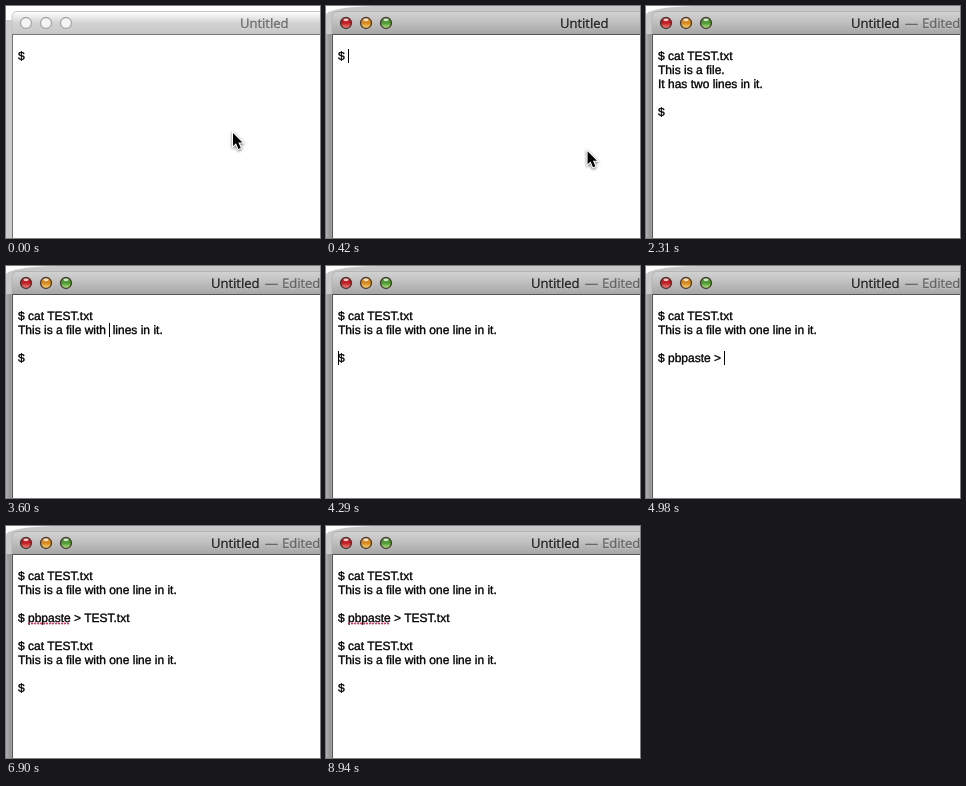
These frames come from a looping animation (314 px wide and 232 px high, 9120 ms). An HTML page with a canvas:

```html
<!DOCTYPE html>
<html lang="en">
<head>
<meta charset="utf-8">
<title>Editing a file in a text window</title>
<style>
html, body { margin: 0; width: 100%; height: 100%; overflow: hidden; background: #fff; }
canvas { display: block; }
</style>
</head>
<body>
<canvas id="stage" width="314" height="232"></canvas>
<script>
const LOOP = 9120, LEFT = 12, TOP = 43, ROW = 14;
const CLICK = 210, EDITED = 1320, SPELL = 5520;
const BODY = '12px "Liberation Sans", Arial, sans-serif';
const TITLE = '13px "Open Sans", sans-serif';
const ctx = document.getElementById('stage').getContext('2d');
ctx.textRendering = 'geometricPrecision';

// The document is built by an edit script; each edit stores a snapshot.
const states = [];
let text = '$ ', pos = 2, anchor = 2;
const save = t => states.push({ t, text, pos, anchor });

function replace(t, part) {
  const a = Math.min(pos, anchor), b = Math.max(pos, anchor);
  text = text.slice(0, a) + part + text.slice(b);
  pos = anchor = a + part.length;
  save(t);
}
function type(t, gap, parts) {
  [...parts].forEach((part, i) => replace(t + i * gap, part));
}
function go(t, p) { pos = anchor = p; save(t); }
function select(t, p) { pos = p; save(t); }
function backspace(t) { anchor = pos - 1; replace(t, ''); }
const after = word => text.indexOf(word) + word.length;

save(0);
type(1320, 40, 'cat TEST.txt');
type(1800, 45, ['\n', 'This is a file.', '\nIt has two lines in it.', '\n', '\n$ ']);

go(2430, after('in it.\n'));
go(2490, after('It '));
go(2550, after('\nT'));
go(2610, after('file.'));
backspace(2700);
type(2760, 72, ' with ');
select(3150, after('with \n'));
select(3180, after('It'));
select(3210, after('It '));
select(3240, after('has'));
select(3270, after('has '));
select(3300, after('two'));
replace(3600, '');
type(3630, 60, 'one');
go(3870, after('lines'));
backspace(3990);
go(4140, after('it.\n'));
go(4230, text.length - 2);
go(4320, text.length);

type(4530, 50, 'pbpaste > ');
type(5040, 52, 'TEST.txt');
replace(5520, '\n\n$ ');
type(5670, 60, ['ca', 't ', 'TE', 'ST', '.t', 'xt']);
type(6120, 67.5, ['\n', 'This is a file with one line in it.', '\n', '\n', '$ ']);

// Caret is hidden between each pair of times.
const hidden = [[0, 210], [450, 690], [930, 1170], [2220, 2430], [6660, 6720],
  [6900, 7170], [7410, 7680], [7920, 8160], [8430, 8670], [8940, LOOP]];

function box(x, y, w, h, fill) {
  ctx.fillStyle = fill;
  ctx.fillRect(x, y, w, h);
}
function shade(x0, y0, x1, y1, ...colors) {
  const g = ctx.createLinearGradient(x0, y0, x1, y1);
  colors.forEach((c, i) => g.addColorStop(i / (colors.length - 1), c));
  return g;
}
// A thin outline gives the text its heavier weight.
function label(str, x, y, color) {
  ctx.fillStyle = ctx.strokeStyle = color;
  ctx.lineWidth = 0.35;
  ctx.fillText(str, x, y);
  ctx.strokeText(str, x, y);
}
function titleText(str, x, color) {
  ctx.fillStyle = 'rgba(255,255,255,.45)';
  ctx.fillText(str, x, 23);
  label(str, x, 22, color);
}

function button(x, active, dark, light) {
  ctx.beginPath();
  ctx.arc(x, 17, 5.5, 0, 7);
  ctx.fillStyle = active ? shade(0, 11, 0, 23, dark, dark, light) : '#f4f4f4';
  ctx.fill();
  ctx.lineWidth = 1.3;
  ctx.strokeStyle = active ? 'rgba(45,30,25,.8)' : '#a8a8a8';
  ctx.stroke();
  if (!active) return;
  ctx.beginPath();
  ctx.ellipse(x, 13.8, 2.6, 1.4, 0, 0, 7);
  ctx.fillStyle = 'rgba(255,255,255,.75)';
  ctx.fill();
}

function drawWindow(t) {
  const active = t >= CLICK;
  box(0, 0, 314, 232, '#fff');
  if (active) {
    ctx.beginPath();
    ctx.ellipse(50, 9, 50, 9, 0, Math.PI, Math.PI * 1.5);
    ctx.lineTo(314, 0);
    ctx.lineTo(314, 28);
    ctx.lineTo(0, 28);
    ctx.fillStyle = '#c9c9c9';
    ctx.fill();
  }
  box(0, active ? 28 : 14, 6, 218, active ? shade(0, 0, 6, 0, '#aeaeae', '#8c8c8c') : '#ccc');

  ctx.beginPath();
  ctx.roundRect(6, 5.5, 330, 240, [5, 0, 0, 0]);
  ctx.fillStyle = active ? shade(0, 6, 0, 28, '#d2d2d2', '#bebebe', '#a6a6a6')
                         : shade(0, 6, 0, 28, '#fff', '#d2d2d2', '#c8c8c8');
  ctx.fill();
  ctx.lineWidth = 1;
  ctx.strokeStyle = active ? '#b4b4b4' : '#c4c4c4';
  ctx.stroke();
  box(6, 28, 308, 1, active ? '#555' : '#777');
  box(6, 28, 1, 204, active ? '#555' : '#777');
  box(7, 29, 307, 203, '#fff');

  button(20, active, '#c01f25', '#ff9b90');
  button(40, active, '#d58a1f', '#ffe28a');
  button(60, active, '#4d9a30', '#c9f09a');

  ctx.font = TITLE;
  if (t < EDITED) return titleText('Untitled', 234, active ? '#222' : '#6c6c6c');
  titleText('Untitled', 205, '#222');
  titleText('—', 259, '#666');
  titleText('Edited', 276, '#666');
}

function drawDocument(t) {
  const s = states.findLast(state => state.t <= t);
  const from = Math.min(s.pos, s.anchor), to = Math.max(s.pos, s.anchor);
  const x = str => LEFT + ctx.measureText(str).width;
  ctx.font = BODY;
  let start = 0;
  s.text.split('\n').forEach((line, i) => {
    const y = TOP + i * ROW, end = start + line.length;
    if (from < to && from <= end && to > start) {
      const x0 = x(line.slice(0, Math.max(0, from - start)));
      const x1 = to > end ? 314 : x(line.slice(0, to - start));
      box(x0, y, x1 - x0, ROW, '#b5d5fd');
    }
    label(line, LEFT, y + 11, '#000');
    if (t >= SPELL && line.includes('pbpaste')) {
      ctx.save();
      ctx.lineWidth = 2.2;
      ctx.lineCap = 'round';
      ctx.setLineDash([0, 3]);
      ctx.strokeStyle = '#d4365c';
      ctx.beginPath();
      ctx.moveTo(x('$ ') + 1, y + 12.5);
      ctx.lineTo(x('$ pbpaste'), y + 12.5);
      ctx.stroke();
      ctx.restore();
    }
    const blinkOff = hidden.some(([a, b]) => t >= a && t < b);
    if (from === to && from >= start && from <= end && !blinkOff) {
      box(Math.floor(x(line.slice(0, from - start))), y, 1, ROW, '#000');
    }
    start = end + 1;
  });
}

function drawPointer(t) {
  if (t >= 540) return;
  const k = Math.max(0, (t - 240) / 300) ** 2;
  ctx.save();
  ctx.translate(227 + 95 * k, 127 + 50 * k);
  ctx.beginPath();
  [[0, 0], [0, 13], [3, 10.3], [5.4, 16], [7.8, 15], [5.4, 9.5], [9.4, 9.5]]
    .forEach(p => ctx.lineTo(...p));
  ctx.closePath();
  ctx.shadowColor = 'rgba(0,0,0,.6)';
  ctx.shadowBlur = 3;
  ctx.shadowOffsetY = 1;
  ctx.lineWidth = 2;
  ctx.strokeStyle = '#fff';
  ctx.stroke();
  ctx.shadowColor = 'transparent';
  ctx.fillStyle = '#000';
  ctx.fill();
  ctx.restore();
}

function draw() {
  const t = performance.now() % LOOP;
  drawWindow(t);
  drawDocument(t);
  drawPointer(t);
  requestAnimationFrame(draw);
}
draw();
</script>
</body>
</html>
```
